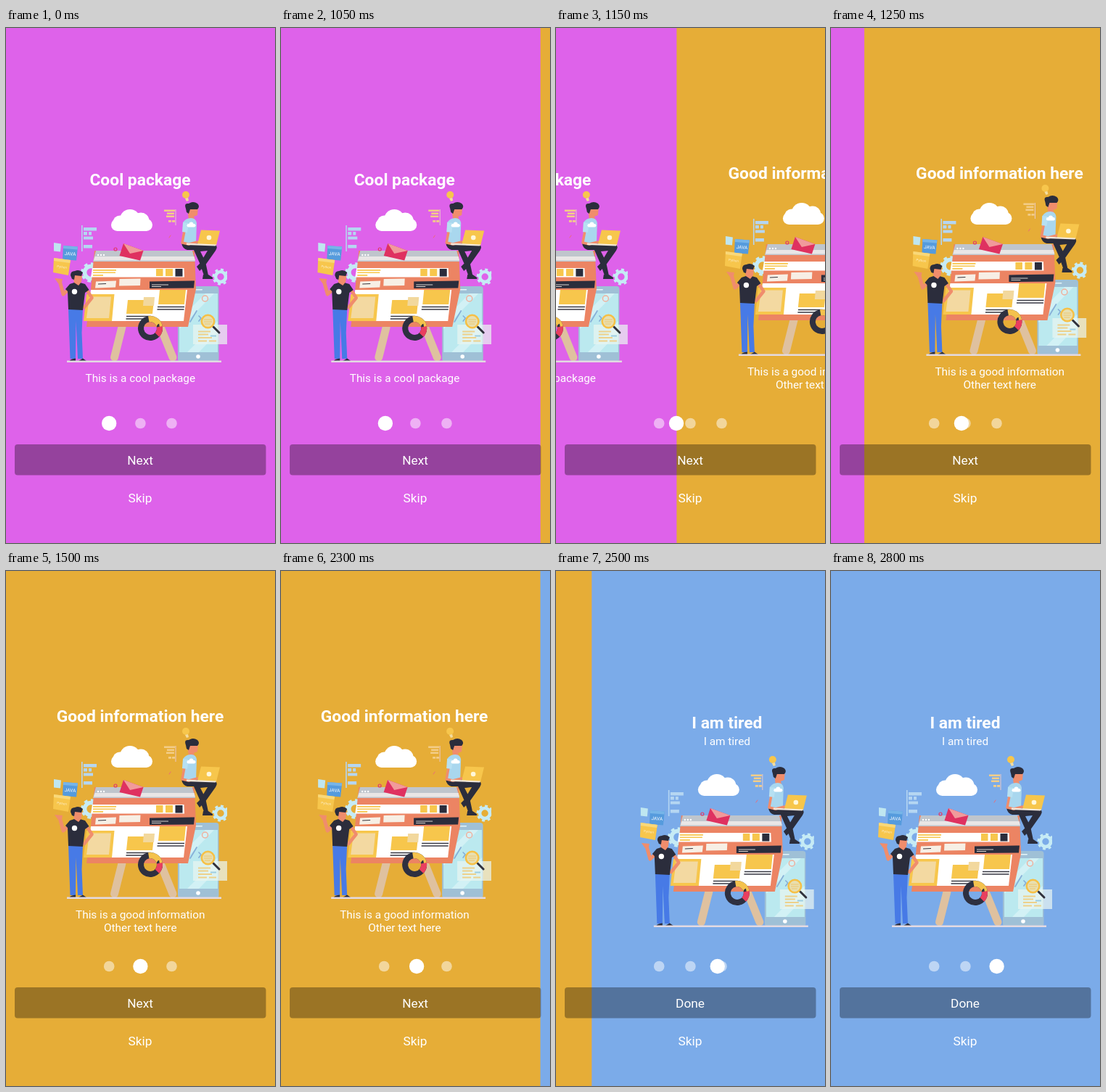
These frames come from a looping animation (371 by 710 pixels, 4250 ms). An HTML page:

```html
<!DOCTYPE html>
<html lang="en">
<head>
<meta charset="utf-8">
<title>Intro slides</title>
<style>
  html, body { margin: 0; width: 100%; height: 100%; overflow: hidden; background: #de62ea; }
  #stage { display: block; width: 371px; height: 710px; font-family: Roboto, sans-serif; --p: 0; }
  #stage text { text-anchor: middle; fill: #fff; }
  .title { font-size: 22.8px; font-weight: 700; }
  .body { font-size: 15.35px; }
  .label { font-size: 17.3px; }
  /* pages are 374px wide, centred on the stage */
  #pages { transform: translateX(calc(var(--p) * -374px)); }
  #active { transform: translateX(calc(var(--p) * 43.2px)); }
  .dark { fill: #2b2d3c; } .skin { fill: #f08d6c; } .gold { fill: #f7c64c; }
  .cyan { fill: #bfe6f0; } .orange { fill: #ec8463; } .white { fill: #fff; }
  .line { fill: none; stroke-linecap: round; stroke-linejoin: round; }
</style>
</head>
<body>
<svg id="stage" viewBox="0 0 371 710">
  <defs>
    <clipPath id="frame"><rect x="65" y="220" width="240" height="245"/></clipPath>
    <g id="gear" fill="none" stroke="#c6ebf5">
      <circle r="7" stroke-width="4.600"/>
      <circle r="10" stroke-width="3" pathLength="16" stroke-dasharray="1 1"/>
    </g>

    <g id="art" clip-path="url(#frame)">
      <!-- sky -->
      <g class="white">
        <rect x="145" y="263" width="57" height="17" rx="8.500"/>
        <circle cx="157" cy="268" r="9.500"/><circle cx="171" cy="264" r="14"/><circle cx="186" cy="266" r="11.500"/>
      </g>
      <circle class="gold" cx="248" cy="230" r="5"/>
      <path d="M247 235l4-1 1 4-3 1z" fill="#f3dda0"/>
      <path d="M104 272h1.600v36h-1.600zM107 275h18v4.500h-18zM107 281h5v4.500h-5zM114 281h4v4.500h-4zM107 287.500h13v4h-13zM107 299h12v4.500h-12z" fill="#b5d6f2"/>
      <path d="M218 250.500h15v2.500h-15zM222 254.500h10v2.500h-10zM221 258.500h11v2.500h-11zM224 265h4v2.800h-4zM229 265h4v2.800h-4z" fill="#f3cd88"/>
      <path d="M233.500 250h1v22h-1z" fill="#e9c9c8"/>
      <path class="line" d="M225 289l2-3" stroke="#ec6b78"/>

      <!-- phone and gears -->
      <use href="#gear" transform="translate(117 337) scale(1.2)"/>
      <use href="#gear" x="296" y="343"/>
      <rect x="237" y="356" width="56.500" height="104" rx="4" fill="#9fc0d6"/>
      <rect x="239" y="366" width="53" height="81" fill="#bbe9ef"/>
      <path d="M239 402l36-36h12l-48 49zM250 447l42-43v16l-26 27z" fill="#d2f1f5"/>
      <rect x="256" y="360" width="15" height="1.600" rx=".8" fill="#e5f5f8"/>
      <circle class="white" cx="265" cy="453" r="2.800"/>
      <circle cx="274.500" cy="373" r="4" fill="none" stroke="#edb09d" stroke-width="1.500"/>
      <path class="line" d="M254 405l9-15M266 397l3 3-3 4" stroke="#86afd8" stroke-width="1.700"/>

      <!-- board -->
      <path class="line" d="M160 412L149.500 454M213 412L230 454" stroke="#dfc19f" stroke-width="11"/>
      <path class="orange" d="M122 307H260L262 360L251 412H111L117 360Z"/>
      <path d="M124 307H257L261 322H120Z" fill="#bfc5cc"/>
      <path d="M122.500 315H259.500L261 320.500H121Z" fill="#e9e6e6"/>
      <g class="white"><circle cx="127" cy="313" r="1.200"/><circle cx="131" cy="313" r="1.200"/><circle cx="135" cy="313" r="1.200"/></g>
      <path class="white" d="M119 331H245.500L246 343.500H117Z"/>
      <path class="gold" d="M120 333h32v1.700h-32zM120 336.500h31v1.500h-31zM120 340h14v1.700h-14zM207 332h9.500v10h-9.500zM220 332h10v10h-10z"/>
      <path class="dark" d="M233.500 332h10v10.500h-10zM198 349.500L260 348.500L259 358.500L198 359Z"/>
      <path d="M124 349.500l28-1-1 9-28 1zM156.500 346l29-.5-.5 9.500-29 .5z" fill="#f7efe5"/>
      <path d="M201 354h23M201 356.500h13" stroke="#d9d5d0"/>
      <path d="M127 353l11-.5" stroke="#34333c"/>
      <path class="white" d="M117 361H250L245 404H112Z"/>
      <path class="gold" d="M111 367H149.500L146 404H107Z"/>
      <path d="M115 370.500H145L142 400H111Z" fill="#f3d9a1"/>
      <path class="gold" d="M168 375h36l-2 19h-36zM212 361h36l-2 20h-36z"/>
      <path d="M190 371h15l-1 12h-15z" fill="#f2d89d"/>
      <path d="M209 384.500h37M208.500 388h37M166 397.500h34M165.500 401h26" stroke="#383944" stroke-width="1.500"/>

      <!-- donut: dark ring with two coloured arcs -->
      <g transform="rotate(-100 199 414)" fill="none" stroke-width="8">
        <circle cx="199" cy="414" r="13" stroke="#2e3040"/>
        <circle cx="199" cy="414" r="13" stroke="#f4c24d" pathLength="100" stroke-dasharray="25 75"/>
        <circle cx="199" cy="414" r="13" stroke="#e93f5f" pathLength="100" stroke-dasharray="15 85" stroke-dashoffset="-25"/>
      </g>

      <!-- envelope -->
      <path d="M162 297L189.500 307L185 320.500L156.500 314Z" fill="#df3160"/>
      <path d="M162 297L189.500 307L171 311Z" fill="#f19a9b"/>
      <circle cx="151" cy="305" r="2" fill="none" stroke="#e13a6a" stroke-width="1.200"/>

      <!-- magnifier -->
      <rect x="258" y="409" width="47" height="27" fill="#e9f6f2" opacity=".72"/>
      <path d="M265 418.500h17M265 422.500h14M265 427h19M265 431.500h12M280 431.500h10" stroke="#edd18b" stroke-width="2"/>
      <path d="M282 424.500h8" stroke="#9dcde0" stroke-width="2"/>
      <path class="line" d="M286 412l8 8" stroke="#30313c" stroke-width="3"/>
      <circle cx="278.500" cy="404.500" r="8.700" fill="#e8dfb0" stroke="#f6c046" stroke-width="2.600"/>
      <path d="M273 402h11M273 405h11M274 408h8" stroke="#eec66e"/>

      <!-- boxes in hand -->
      <path d="M66 296l10 1.500-1 11-9-1z" class="cyan"/>
      <path d="M79 300l20 1.500-2 19-19-1.500z" fill="#559bdd"/>
      <path d="M79 300l20 1.500-.5 4-19.500-1.500z" fill="#77b5e8"/>
      <text x="88.500" y="313.500" font-size="6.500" transform="rotate(4 88 311)">JAVA</text>
      <path d="M66 317l23 3-3 21-21-4z" class="gold"/>
      <path d="M66 317l23 3-.8 4-22.200-3z" fill="#f9d879"/>
      <text x="77" y="331" font-size="4.500" transform="rotate(8 77 330)" opacity=".7">Python</text>

      <!-- standing man -->
      <path class="line" d="M90 357L79 367L74 349" stroke="#f08d6c" stroke-width="5"/>
      <path class="skin" d="M67 345l11 1-1 5-5 1z"/>
      <path class="line" d="M110 359L118.500 372L108 385" stroke="#f08d6c" stroke-width="4.500"/>
      <path d="M86 387H106L104.500 420L106 456H99L96.500 404L96 456H88.500Z" fill="#477ae6"/>
      <path class="dark" d="M86 388L85 363L82 360L88 353L94 351H102L109 353L114.500 361L109 365L106 389Z"/>
      <path class="skin" d="M92 341H105L104 350L100 355L94 351Z"/>
      <path class="dark" d="M89 341Q89 335 95 335Q101 332 106 337L104 342L95 341L94 347L91 346Z"/>
      <circle cx="94.500" cy="363.500" r="3.700" class="white"/>
      <path class="dark" d="M96 455.500v3.500H87.500Q89 456 96 455.500zM106 455.500l5 3.500H100z"/>
      <path d="M84 458.500H297V461H84Z" fill="#e3dae2"/>

      <!-- seated man -->
      <path class="dark" d="M242 296L262 295L288 298Q293 301 289 307L272 331L266 327L278 307L268 308L275 322L279 341H273L267 324L259 306L250 306Q243 304 242 296Z"/>
      <path class="dark" d="M267 325l5 5-5 5-4-6zM272 340h7l6 4v2H271z"/>
      <path class="skin" d="M250 247H265L264 258L259 260L261 266L252 265Z"/>
      <path d="M244 268Q248 262 255 262Q262 262 263 269L262 297H243L244 280Z" fill="#a9d7ee"/>
      <path class="line" d="M246 280L243 296L252 298L264 295" stroke="#f08d6c" stroke-width="3.500"/>
      <path d="M244 268l8 1-2 13-7-1z" fill="#b6e0f2"/>
      <path class="dark" d="M248 249Q245 241 252 242Q258 238 264 242Q268 246 264 250L254 250L252 256L249 254Z"/>
      <g class="white"><rect x="249.500" y="270" width="12" height="4.500" rx="2.200"/><circle cx="255.500" cy="270.500" r="3"/></g>
      <path class="gold" d="M269 278.500L295 279.500L290 299.500L264 298Z"/>
      <circle cx="280" cy="289" r="3.300" fill="#fff7d8"/>
      <path d="M249 296.500L290 298.500L289 300.500L249 299Z" fill="#f2e8db"/>
    </g>
  </defs>

  <g id="pages">
    <g>
      <rect x="-1.500" width="374.500" height="710" fill="#de62ea"/>
      <use href="#art"/>
      <text class="title" x="185" y="217">Cool package</text>
      <text class="body" x="185.300" y="488">This is a cool package</text>
    </g>
    <g transform="translate(374)">
      <rect x="-1.500" width="374.500" height="710" fill="#e6ad37"/>
      <use href="#art" y="-9"/>
      <text class="title" x="185" y="208">Good information here</text>
      <text class="body" x="185.300" y="479">This is a good information</text>
      <text class="body" x="185.300" y="497">Other text here</text>
    </g>
    <g transform="translate(748)">
      <rect x="-1.500" width="374.500" height="710" fill="#7babe9"/>
      <use href="#art" y="30"/>
      <text class="title" x="185" y="217">I am tired</text>
      <text class="body" x="185" y="240">I am tired</text>
    </g>
  </g>

  <g class="white">
    <g opacity=".5">
      <circle cx="142.200" cy="545" r="7.300"/><circle cx="185.400" cy="545" r="7.300"/><circle cx="228.500" cy="545" r="7.300"/>
    </g>
    <circle id="active" cx="142.200" cy="545" r="10.200"/>
  </g>
  <rect x="12" y="574" width="346.500" height="42.500" rx="4" opacity=".33"/>
  <text id="next" class="label" x="185" y="602">Next</text>
  <text class="label" x="185" y="654">Skip</text>
</svg>

<script>
  const LOOP = 4250, STEP = 50;
  const stage = document.getElementById('stage');
  const next = document.getElementById('next');
  const start = performance.now();

  // cubic-bezier(x1, .1, .25, 1)
  function ease(x1, x) {
    if (x <= 0) return 0;
    if (x >= 1) return 1;
    const curve = (s, a, b) => 3 * (1 - s) ** 2 * s * a + 3 * (1 - s) * s * s * b + s ** 3;
    let lo = 0, hi = 1;
    for (let i = 0; i < 24; i++) {
      const mid = (lo + hi) / 2;
      if (curve(mid, x1, .25) < x) lo = mid; else hi = mid;
    }
    return curve(lo, .1, 1);
  }

  function draw() {
    const t = Math.floor((performance.now() - start) % LOOP / STEP) * STEP;
    const page = ease(.25, (t - 1028.5) / 380) + ease(.44, (t - 2261.5) / 400);
    stage.style.setProperty('--p', page.toFixed(4));
    next.textContent = page >= 1.5 ? 'Done' : 'Next';
    requestAnimationFrame(draw);
  }
  draw();
</script>
</body>
</html>
```
